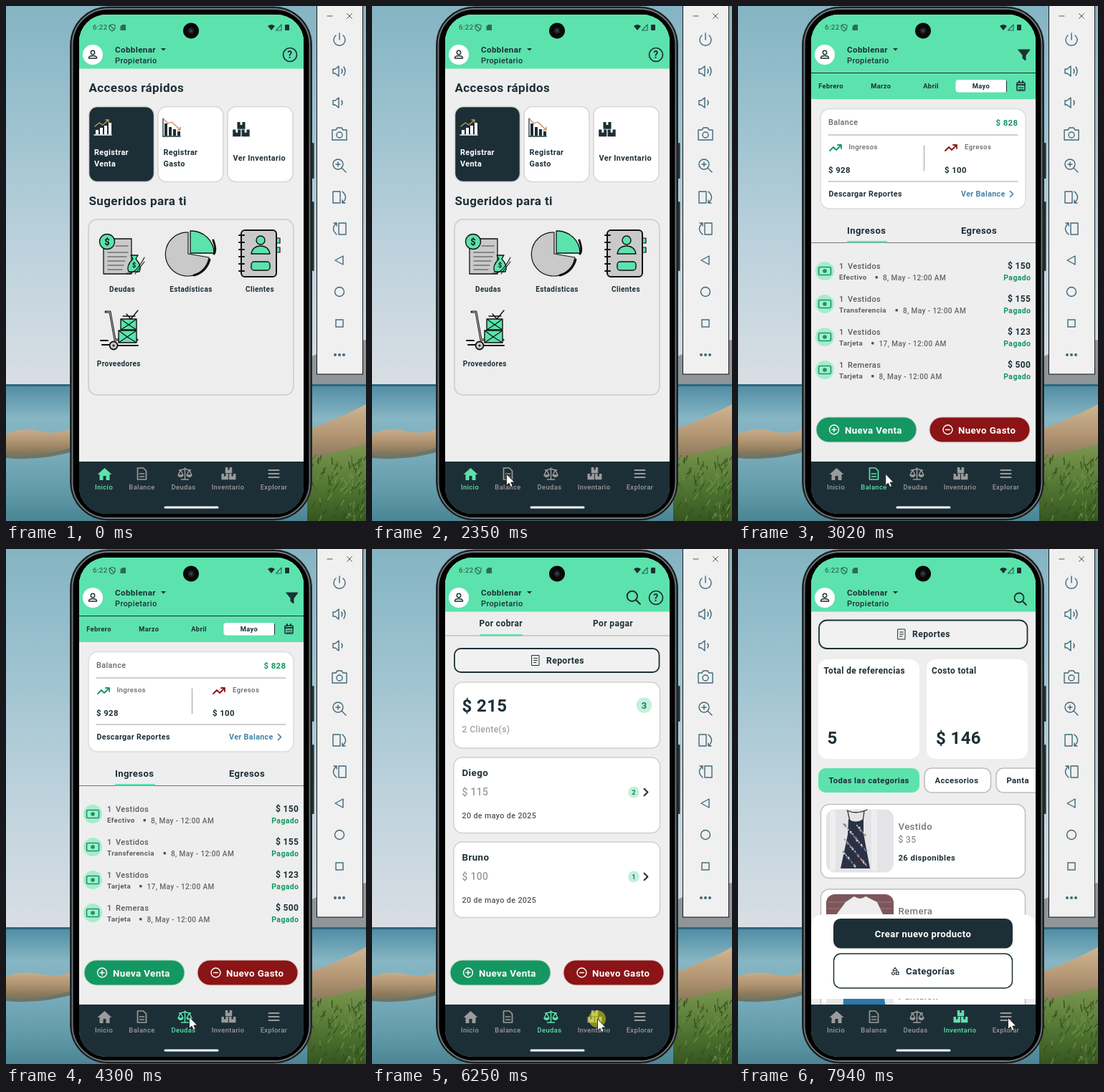
An HTML page for the animation above (8000 ms loop, 502x719 px).

```html
<!DOCTYPE html>
<html lang="es">
<head>
<meta charset="utf-8">
<title>App de ventas</title>
<style>
html, body { margin: 0; width: 100%; height: 100%; overflow: hidden; }
svg { display: block; width: 502px; height: 719px; }
text { font-family: Roboto, sans-serif; letter-spacing: .38px; white-space: pre; }
path, circle { stroke-linecap: round; stroke-linejoin: round; }
</style>
</head>
<body>
<svg id="stage" viewBox="0 0 502 719"></svg>
<script>
const ink = '#1d2f36', mint = '#5ce2ad', green = '#159762', red = '#8a1416', gray = '#9b9b9b', paper = '#eee';

// Drawing helpers; text is placed by its vertical centre.
const paint = (fill, stroke, width) =>
  `fill="${fill || 'none'}"` + (stroke ? ` stroke="${stroke}" stroke-width="${width || 1}"` : '');
const R = (x, y, w, h, r, ...p) => `<rect x="${x}" y="${y}" width="${w}" height="${h}" rx="${r}" ${paint(...p)}/>`;
const C = (x, y, r, ...p) => `<circle cx="${x}" cy="${y}" r="${r}" ${paint(...p)}/>`;
const P = (d, ...p) => `<path d="${d}" ${paint(...p)}/>`;
const T = (x, y, size, str, fill = ink, weight = 600, anchor = 'start') =>
  `<text x="${x}" y="${y + size * .355}" font-size="${size}" fill="${fill}" font-weight="${weight}" text-anchor="${anchor}">${str}</text>`;
const M = (x, y, size, str, fill, weight) => T(x, y, size, str, fill, weight, 'middle');
const G = (id, ...parts) => `<g id="${id}">${parts.join('')}</g>`;
const at = (x, y, body, scale = 1) => `<g transform="translate(${x} ${y}) scale(${scale})">${body}</g>`;

// Icons around their own centre.
const boxes = c => P(['-10 0', '.5 0', '-4.7 -9'].map(p => `M${p}h3.500v3.500h2.400v-3.500h3.500v8.300h-9.400z`).join(''), c);
const scales = P('M0-8V8M-5 8H5M-8-5Q-4-5 0-7Q4-5 8-5M-6-5L-9.500 2H-2.500ZM6-5L2.500 2H9.500Z', '', 'currentColor', 1.5)
  + P('M-10 2H-2Q-3 5-6 5T-10 2M2 2H10Q9 5 6 5T2 2', 'currentColor');
const sheet = P('M-6-8H2L6-4V8H-6ZM-3 0H3M-3 4H3', '', 'currentColor', 1.7);
const home = P('M-10 1L0-8L10 1H7V9H2V3H-2V9H-7V1Z', 'currentColor');
const menu = P('M-7-5H7M-7 0H7M-7 5H7', '', 'currentColor', 2);
const search = C(-2, -2, 6.5, '', ink, 1.8) + P('M3 3L8 8', '', ink, 2);
const help = C(0, 0, 9.5, '', ink, 1.7) + M(0, .3, 14, '?', ink, 700);
const funnel = P('M-8-7H8L2 1V8L-2 5V1Z', ink, ink, 1);
const trend = c => P('M-8 4L-3-1L1 3L8-4M3-4H8V1', '', c, 1.8);
const report = P('M-5-7H5V7H-5ZM-2.500-3H2.500M-2.500 0H2.500M-2.500 3H1', '', ink, 1);
const chevron = c => P('M-2-4L2 0L-2 4', '', c, 1.7);

const fade = (id, ...colors) => `<linearGradient id="${id}" x2="0" y2="1">`
  + colors.map((c, i) => `<stop offset="${i / (colors.length - 1)}" stop-color="${c}"/>`).join('') + '</linearGradient>';

function backdrop() {
  let seed = 7, blades = '';
  const rnd = () => (seed = seed * 16807 % 2147483647) / 2147483647;
  for (let i = 0; i < 130; i++) {
    const x = 422 + rnd() * 80, y = 632 + rnd() * 90;
    blades += P(`M${x} ${y}l${rnd() * 10 - 3} ${-3 - rnd() * 7}`, '', ['#2f4f1f', '#6f8f48', '#48692c'][i % 3], 1.3);
  }
  return '<defs>' + fade('sky', '#84b4c3', '#9fc3d0', '#bfd3dd', '#d9dee4')
    + fade('lake', '#4e8ba3', '#87b6c4', '#79acba', '#659dac', '#4b8594')
    + fade('reeds', '#d0b592', '#b39674', '#7f7155') + fade('meadow', '#7d9650', '#557a35', '#35561f')
    + '<clipPath id="glass"><rect x="102" y="12" width="313" height="697" rx="38"/></clipPath></defs>'
    + R(0, 0, 502, 530, 0, 'url(#sky)')
    + P('M420 492Q460 472 502 466V530H420Z', '#8e9699')
    + R(0, 528, 502, 191, 0, 'url(#lake)')
    + P('M0 529.500H502', '', '#2f677d', 3)
    + P('M0 597Q25 588 50 594T100 586V614Q50 630 0 626Z', 'url(#reeds)')
    + P('M0 626Q50 630 100 614V620Q50 636 0 631Z', '#6d7566')
    + P('M420 592Q460 578 502 556V640H420Z', 'url(#reeds)')
    + P('M420 634Q460 622 502 612V719H420Z', 'url(#meadow)') + blades;
}

function toolbar() {
  const c = '#41677a', speaker = 'M-9-3H-6L-1-7V7L-6 3H-9Z';
  const L = d => P(d, '', c, 1.4);
  const icons = [
    L('M-5-6A8 8 0 1 0 5-6M0-9V0'),
    L(speaker + 'M3-3Q5 0 3 3M6-6Q10 0 6 6'),
    L(speaker + 'M3-3Q5 0 3 3'),
    L('M-10-6H-5L-3-9H3L5-6H10V8H-10Z') + C(0, 1, 4, '', c, 1.4),
    C(-2, -2, 7, '', c, 1.4) + L('M3 3L9 9M-5-2H1M-2-5V1'),
    L('M-9-8H1V8H-9ZM4-8Q13 0 4 8M4 8V4M4 8H8'),
    L('M-1-8H9V8H-1ZM-4-8Q-13 0-4 8M-4-8V-4M-4-8H-8'),
    L('M-6 0L5-6V6Z'), C(0, 0, 6.5, '', c, 1.4), R(-5, -5, 10, 10, 0, '', c, 1.4),
    [-6, 0, 6].map(x => C(x, 0, 2, c)).join('')
  ];
  return R(433.5, -2, 64, 516, 0, '#f0f0f0', '#151515', 1)
    + P('M448 14H455M475.500 10.500L482.500 17.500M482.500 10.500L475.500 17.500', '', '#555', 1)
    + icons.map((icon, i) => at(465, 47 + 44 * i, icon)).join('');
}

function phone() {
  return R(427, 191, 2.5, 50, 1, '#24292c') + R(427, 273, 2.5, 97, 1, '#24292c')
    + R(89.5, 1, 337, 717, 53, '#15181a', '#2b3235', 1) + R(92.5, 4, 331, 711, 50, '#050505', '#727a7d', 1.8)
    + R(95, 6.5, 326, 706, 47, '#000');
}

function header() {
  return R(102, 12, 313, 75.5, 0, mint)
    + C(121, 68, 14, '#fff') + C(121, 65, 2.7, '', ink, 1.4) + P('M115.500 73V72Q116 69.500 121 69.500T126.500 72V73Z', '', ink, 1.4)
    + G('shop', T(152, 60.5, 11.6, 'Cobblenar'), P('M216 59H223L219.500 62.500Z', ink))
    + G('role', T(152, 76, 11, 'Propietario', ink, 500));
}

function homeScreen() {
  const card = (x, fill, edge) => R(x, 140.5, 91, 105, 12, fill, edge, 1.5);
  const bars = (c, hs) => hs.map((h, i) => R(-9 + i * 6, 9 - h, 4, h, 0, c)).join('') + P('M-11 10H13', '', c, 1.5);
  const k = '#111', g = '#c9c9c9';
  const debts = P('M136 325H175V374H136Z', g, k, 1.3)
    + P('M153 335H170M142 344H170M142 350H168M142 356H166M142 362H164M142 368H162', '', '#444', 1.2)
    + C(141, 329, 10.5, mint, k, 1.3) + M(141.2, 329, 13, '$', k)
    + P('M174 348H184L181 353Q190 363 186 371H171Q167 363 177 353Z', mint, k, 1.3) + M(178.7, 362, 9, '$', k)
    + P('M168 373Q180 376 193 351M180 374L193 357', '', k, 1.1);
  const pie = P('M254 316A30.500 30.500 0 1 0 283 351L254 346Z', g, k, 1.2)
    + P('M284 354A30 30 0 0 1 262 376M289 327Q294 341 290 346', '', k, 3)
    + P('M257 314A32 31 0 0 1 290 345H257Z', mint, k, 1.3);
  const book = R(328, 313, 49, 65, 5, g, k, 2)
    + P('M378 324H382V331H378M378 337H382V344H378', mint, k, 1.2)
    + [0, 1, 2, 3, 4, 5].map(i => P(`M325 ${320 + i * 10}H332`, '', k, 2)).join('')
    + C(355, 327, 6, mint, k, 1.4) + P('M342 346Q344 335 355 335T368 346Z', mint, k, 1.4)
    + R(342, 357, 26, 12, 4, mint, k, 1.4);
  const cart = P('M139 427H145L152 466H183', '', k, 3) + P('M140 427H145L152 466H183', '', '#ccc', 1)
    + R(160, 437, 22, 15, 1, mint, k, 1.4) + R(157, 453, 25, 17, 1, mint, k, 1.4)
    + P('M160 437L171 445L182 437M160 452L171 445L182 452M157 453L169 462L182 453M157 470L169 462L182 470', '', k, 1.2)
    + P('M163 433H180M168 430L174 437L184 425', '', k, 1.4)
    + P('M134 473H145M155 474H184M132 467H142', '', k, 2) + C(150, 474, 5.5, g, k, 1.8) + C(150, 474, 1.5, k);
  return G('home', at(396, 68, help),
    T(115.5, 114, 17, 'Accesos rápidos'), T(115.5, 271.5, 17, 'Sugeridos para ti'),
    card(115.5, ink, '#d5d5d5'), card(212, '#fff', '#d5d5d5'), card(309, '#fff', '#d5d5d5'),
    at(134, 170, bars('#fff', [6, 9, 12, 16]) + P('M-10-2L-4-7L1-4L9-11M5-11H9V-7', '', '#c79a57', 1.3)),
    at(230, 172, bars(ink, [17, 12, 9, 6]) + P('M-11-15V10', '', ink, 1.3) + P('M-10-14L-4-8L1-10L13 1M13-3V1H9', '', '#c58a62', 1.3)),
    at(328, 172.5, boxes(ink), 1.18),
    T(123, 204.5, 10.8, 'Registrar', '#fff'), T(123, 220.5, 10.8, 'Venta', '#fff'),
    T(219.5, 204.5, 10.8, 'Registrar'), T(219.5, 220.5, 10.8, 'Gasto'), T(316.5, 212, 10.8, 'Ver Inventario'),
    R(115, 298, 286, 245, 12, '#ededed', '#cbcbcb', 1.5), debts, pie, book, cart,
    M(162, 395, 10, 'Deudas'), M(258, 395.5, 10, 'Estadísticas'), M(354, 395.5, 10, 'Clientes'), M(157.3, 499, 10, 'Proveedores'));
}

const saleButtons = R(109, 574, 140, 35, 17.5, green, '#c5d8cf', 1) + R(267, 574, 140, 35, 17.5, red, '#dcc5c5', 1)
  + C(134, 591.5, 6.5, '', '#fff', 1.4) + P('M131 591.500H137M134 588.500V594.500', '', '#fff', 1.4)
  + C(292.5, 591.5, 6.5, '', '#fff', 1.4) + P('M289.500 591.500H295.500', '', '#fff', 1.4)
  + T(149, 592, 13.3, 'Nueva Venta', '#fff') + T(307, 592, 13.3, 'Nuevo Gasto', '#fff');

function balanceScreen() {
  const link = '#4283a8';
  const summary = (dy, foot) => P(`M126 ${foot - 17.5}H390M259.500 ${195 + dy}V${230 + dy}`, '', '#a0a0a0', 1)
    + T(126.5, foot, 10.7, 'Descargar Reportes') + T(311, foot, 10.7, 'Ver Balance', link) + at(381.5, foot, chevron(link));
  const caption = y => at(136, y + 1, trend(green)) + at(297, y + 1, trend(red))
    + T(154.5, y, 9.6, 'Ingresos', '#666', 500) + T(316, y, 9.6, 'Egresos', '#666', 500);
  const sales = [['Vestidos', 'Efectivo', 180, '8', 150], ['Vestidos', 'Transferencia', 208, '8', 155],
    ['Vestidos', 'Tarjeta', 174.5, '17', 123], ['Remeras', 'Tarjeta', 174.5, '8', 500]];
  const rows = sales.map(([item, pay, end, day, sum], i) => at(0, i * 46,
    C(121, 370, 13, '#a7ecce') + R(112.5, 364.5, 17, 11, 2, '', green, 1.6) + C(121, 370, 2.8, green)
    + T(141, 363, 11, '1', '#5a5a5a', 500) + T(153, 363, 11, item, '#5a5a5a', 500)
    + T(141, 379, 9.8, pay, '#5d5d5d') + R(end + 11.5, 377, 3.5, 3.5, 1, '#555')
    + T(end + 22, 379, 10.1, day + ', May - 12:00 AM', '#666', 500)
    + T(408.4, 362.5, 12, '$ ' + sum, ink, 600, 'end') + T(408.4, 379.5, 10.5, 'Pagado', green, 600, 'end'))).join('');
  return G('balance', R(102, 87, 313, 43, 0, mint), P('M102 93.500H415', '', ink, 1.2), at(399, 68, funnel),
    R(303.5, 103, 71, 17.5, 4, '#fff'), P('M374.500 105V119', '', ink, 1),
    ['Febrero', 'Marzo', 'Abril', 'Mayo'].map((m, i) => M(129.5 + i * 69.8, 112, 9.3, m)).join(''),
    R(389, 107, 11, 11, 1, '', ink, 1.5) + P('M389 110H400M392 105V107M397 105V107', '', ink, 2) + P('M391.500 113.500H398M391.500 116H398', '', ink, 1),
    R(115, 143.5, 286, 139.5, 13, '#fff', '#dcdcdc', 1.5),
    T(126, 162.5, 10.8, 'Balance', '#666', 500), P('M126 180H390', '', '#a0a0a0', 1),
    G('loading', T(390.4, 163, 11.4, '$ 0', green, 600, 'end'), caption(198.5), summary(-6, 249.5),
      C(126.5, 221.5, 1.4, mint), C(288.5, 221.5, 1.4, mint),
      `<circle id="spinner" cx="258" cy="445" r="10.3" fill="none" stroke="${mint}" stroke-width="2.4" style="stroke-linecap:butt"/>`),
    G('loaded', T(390.4, 162.5, 11.4, '$ 828', green, 600, 'end'), caption(197), summary(0, 262.5),
      T(126, 228.5, 11.4, '$ 928'), T(288, 228.5, 11.4, '$ 100'), rows),
    T(152, 313, 13.1, 'Ingresos'), T(311, 313, 13.1, 'Egresos'),
    P('M102 330.500H415', '', '#777', 1), R(152, 328, 56, 2.5, 1, mint), saleButtons);
}

function debtsScreen() {
  const client = (y, name, sum, n) => R(114, y, 287.5, 105.5, 12, '#fff', '#d0d0d0', 1.5)
    + T(125.5, y + 21, 13.4, name) + T(125.5, y + 48.5, 13.8, '$ ' + sum, gray, 500)
    + T(125.5, y + 81, 10.7, '20 de mayo de 2025', '#555', 500)
    + C(365, y + 48.5, 8, '#c3f1dd') + M(365.2, y + 48.5, 9.5, n, '#1c7f58') + at(382, y + 48.5, chevron(ink), 1.2);
  return G('debts', at(365, 68, search, 1.1), at(396, 68, help),
    T(149.5, 104, 12, 'Por cobrar'), T(308, 104, 12, 'Por pagar'),
    P('M102 121H415', '', '#aaa', 1), R(150, 119, 60, 2.5, 1, mint),
    R(115, 139, 285.5, 33, 9, '#f1f1f1', ink, 1.8), at(228, 155.5, report), T(243, 155.5, 12.2, 'Reportes'),
    G('clients', R(114, 186, 287.5, 92, 12, '#fff', '#d0d0d0', 1.5), T(125.5, 218, 24, '$ 215'),
      T(125.5, 252, 12.1, '2 Cliente(s)', '#a2a2a2', 500), C(379.5, 218, 10.8, '#c3f1dd'), M(379.7, 218, 13, 3, '#1c7f58'),
      client(291, 'Diego', 115, 2), client(409, 'Bruno', 100, 1)), saleButtons);
}

function stockScreen() {
  let flowers = '';
  for (let i = 0; i < 60; i++)
    flowers += C(147 + i * 19 % 33, 384 + i * 23 % 60, 1 + i % 2 * .5, ['#b58a7c', '#d9d3cf', '#6f7f96'][i % 3]);
  const photo = (y, fill, body) => R(123, y, 94, 88, 12, fill) + body;
  const photos = [
    photo(363.5, '#e4e4e7', P('M190 368V446M132 368V446', '', '#eeeef0', 8)
      + P('M153 366L156 380M176 366L174 380M152 365Q165 371 180 364', '', '#333', 1.3)
      + P('M154 377Q164 384 175 377L175 397L184 446H143L153 399Z', '#2b3145') + flowers),
    photo(482, '#7d565c', P('M126 493H214M126 502H214', '', '#8d676b', 2)
      + P('M150 493L162 485Q170 491 178 485L194 493L203 512H136Z', '#eee')),
    photo(600.5, '#e6e8ea', P('M148 606H200L208 650H146Z', '#2a78ad'))];
  const cards = [['Vestido', 35, 26], ['Remera', 20, 18], ['Pantalón', 40, 12]];
  const chip = (x, w, str, fill, edge) => R(x, 306, w, 34, 10, fill, edge, 1.5) + T(x + 14.5, 323, 11.3, str);
  return G('stock', at(394, 70, search),
    R(113, 99.5, 290.5, 39.5, 11, '#f1f1f1', ink, 1.8), at(228, 119, report), T(243, 119, 12.2, 'Reportes'),
    R(112, 154, 141, 139, 13, '#fff'), R(263, 154, 141, 139, 13, '#fff'),
    T(119.5, 170, 11.9, 'Total de referencias'), T(270, 170, 11.9, 'Costo total'),
    T(124.5, 263.5, 24, '5'), T(276, 263.5, 24, '$ 146'),
    chip(112, 141, 'Todas las categorias', mint), chip(260, 92.5, 'Accesorios', '#fff', '#bdbdbd'), chip(360, 90, 'Panta', '#fff', '#bdbdbd'),
    cards.map((_, i) => R(115.5, 356.5 + i * 118.5, 285, 103, 12, '#fff', '#bfbfbf', 1.5)).join(''),
    G('photos', ...photos), G('waiting', C(136, 395, 1.5, mint), C(136, 513.5, 1.5, mint)),
    G('products', ...cards.map(([name, price, n], i) => at(0, i * 118.5,
      T(155, 387, 13.2, name, '#777', 500) + T(155, 406, 12.1, '$ ' + price, '#777', 400) + T(155, 430.5, 11.3, n + ' disponibles')))),
    P('M102 628V528Q102 510 122 510H395Q415 510 415 528V628Z', '#fff'),
    R(133, 516, 250, 41.5, 10, ink), M(258, 537, 13.1, 'Crear nuevo producto', '#fff'),
    R(133.5, 565, 249, 48, 10, '#fff', ink, 1.5), T(234, 589, 13.2, 'Categorías'),
    at(219, 589.5, P('M0-5L3-1H-3Z', '', ink, 1.2) + C(-2.5, 3, 2, '', ink, 1.2) + R(1.5, 1, 3.5, 3.5, 0, '', ink, 1.2)));
}

function navBar() {
  const items = [['Inicio', 136.5, home], ['Balance', 189.5, sheet], ['Deudas', 247.5, scales],
    ['Inventario', 309.5, boxes('currentColor')], ['Explorar', 373.5, menu]];
  return R(100, 636, 317, 80, 0, ink) + items.map(([name, x, icon], i) =>
    `<g class="tab">${at(x + (i == 2 ? 2 : i == 0 || i == 3 ? 1 : 0), 653, icon)}${M(x, 672, 9.4, name, 'currentColor', 500)}</g>`).join('');
}

function statusBar() {
  const c = '#2c6b58';
  return T(121, 30, 9.7, '6:22', c, 500) + P('M148 25.500L152 27V30Q152 33 148 35Q144 33 144 30V27ZM145 27L151 33', '', c, 1.2)
    + P('M162 26H167V34H159.500V28.500Z', c) + P('M365 28Q370 24 375 28L370 34Z', ink)
    + P('M384 26V34H376.500Z', '', c, 1.2) + R(389, 26, 6, 8, 1, ink)
    + C(258, 34.5, 11, '#080808') + C(258, 34.5, 4.5, '#1c2024') + C(258, 34.5, 2, '#3b4247')
    + P('M222 700H295', '', '#fff', 3);
}

stage.innerHTML = backdrop() + phone() + `<g clip-path="url(#glass)">`
  + R(102, 12, 313, 697, 0, paper) + R(102, 12, 313, 70, 0, mint) + R(102, 640, 313, 74, 0, ink)
  + G('app', header(), homeScreen(), balanceScreen(), debtsScreen(), stockScreen(), navBar())
  + statusBar() + '</g>' + toolbar()
  + G('pointer', G('halo', C(0, 0, 12, '#ffff0078')),
    P('M.5.5V16.500L4 13L6.500 18.500L9.200 17.300L6.800 12H11.500Z', '#fff', '#222', .9));

const $ = id => document.getElementById(id);
const show = (id, on) => $(id).style.display = on ? '' : 'none';
const tabs = document.querySelectorAll('.tab');
const screens = ['home', 'balance', 'debts', 'stock'];

// Pointer path: time, x, y.
const path = [[390, 300, 719], [620, 235, 684], [900, 190, 657], [1080, 183, 653], [1150, 184, 653], [1220, 187, 653],
  [2870, 187, 653], [3290, 238, 653], [3570, 255, 653], [5030, 255, 653], [5100, 261, 653], [5400, 300, 657],
  [5580, 319, 658], [5720, 314, 656], [7270, 314, 656], [7600, 350, 658], [7940, 376, 654]];

function pointerAt(t) {
  const i = path.findIndex(p => p[0] > t);
  if (i < 1) return path[i < 0 ? path.length - 1 : 0].slice(1);
  const [a, b] = [path[i - 1], path[i]], k = (t - a[0]) / (b[0] - a[0]);
  return [a[1] + (b[1] - a[1]) * k, a[2] + (b[2] - a[2]) * k];
}

const stepOf = (t, times) => times.filter(s => t >= s).length;

function draw(t) {
  const screen = stepOf(t, [2490, 4440, 6620]), tab = stepOf(t, [2490, 4300, 6460]);
  screens.forEach((id, i) => show(id, i === screen));
  tabs.forEach((el, i) => el.style.color = i === tab ? mint : gray);

  // Opening screens grow slightly into place.
  const age = t - [-1e4, 2490, 4440, -1e4][screen];
  const zoom = 1 - .015 * Math.max(0, 1 - age / 130) ** 2;
  $('app').setAttribute('transform', `translate(258 370) scale(${zoom}) translate(-258 -370)`);

  const named = t < 2490 || t >= 2700;
  show('shop', named);
  $('role').setAttribute('transform', `translate(0 ${named ? 0 : 5})`);
  show('loading', t < 2900);
  show('loaded', t >= 2900);
  const turn = t - 2550, arc = 8 + Math.max(0, turn) * .08;
  $('spinner').setAttribute('stroke-dasharray', `${arc} 100`);
  $('spinner').setAttribute('transform', `rotate(${turn * .4 - 73} 258 445)`);
  show('clients', t >= 4500);

  const ready = t >= 6740;
  show('photos', ready);
  show('waiting', !ready);
  $('products').setAttribute('transform', `translate(${ready ? 68.5 : 0} 0)`);

  show('pointer', t >= 390);
  show('halo', [2280, 4100, 6250].some(s => t >= s && t < s + 70));
  $('pointer').setAttribute('transform', `translate(${pointerAt(t)})`);
}

function tick() {
  draw(performance.now() % 8000);
  requestAnimationFrame(tick);
}
tick();
</script>
</body>
</html>
```
